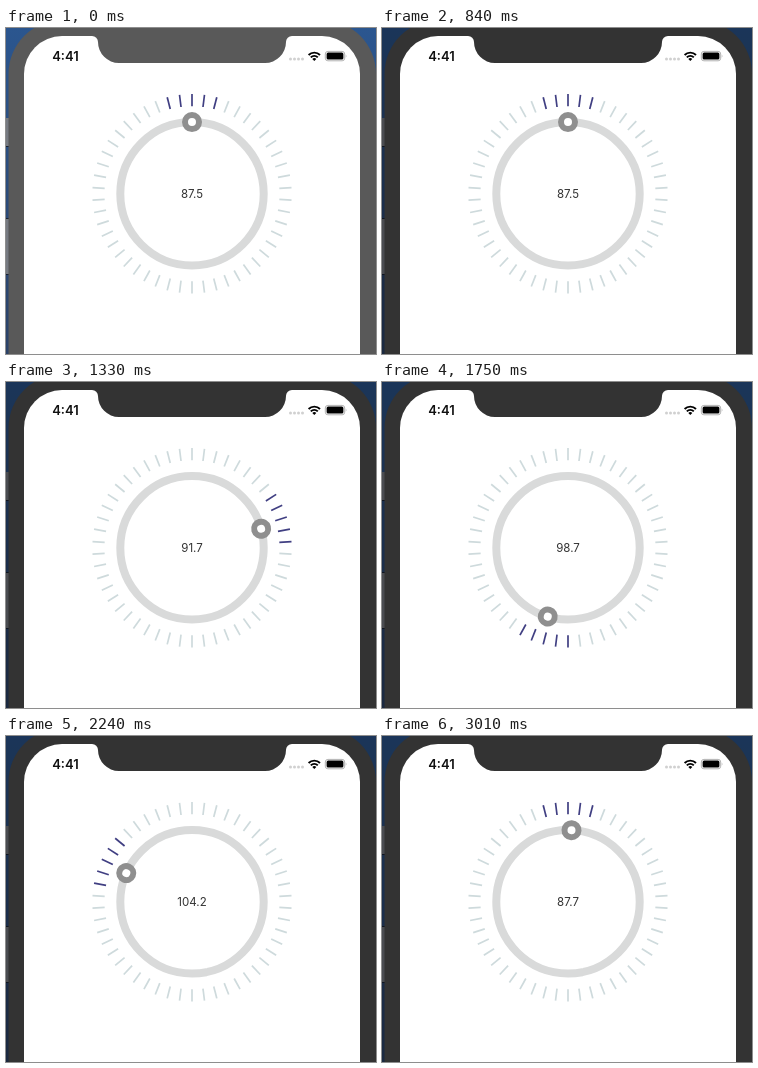
These frames come from a looping animation (370 px wide and 326 px high, 3.64 s). An HTML page:

```html
<!DOCTYPE html>
<html lang="en">
<head>
<meta charset="utf-8">
<title>Dial</title>
<style>
  html, body { margin: 0; width: 100%; height: 100%; overflow: hidden; }
  svg { display: block; width: 370px; height: 326px; font-family: Inter, sans-serif; --case: #333; }
  svg.bright { --case: #595959; }
  .case { fill: var(--case); }
  .backdrop { filter: brightness(.62); }
  .bright .backdrop { filter: none; }
  .tick { stroke: #cedadc; stroke-width: 1.7; }
  .tick.on { stroke: #403f82; }
</style>
</head>
<body>
<svg id="stage" viewBox="0 0 370 326">
  <defs>
    <linearGradient id="sky" x2="0" y2="1">
      <stop offset="0" stop-color="#2b568f"/>
      <stop offset="1" stop-color="#2b4268"/>
    </linearGradient>
  </defs>
  <g class="backdrop">
    <rect width="370" height="326" fill="url(#sky)"/>
    <path d="M0 90h4v28H0zM0 191h4v55H0z" fill="#777b82"/>
    <path d="M0 118h4v1H0zM0 190h4v1H0zM0 246h4v1H0z" fill="#182233"/>
  </g>
  <rect class="case" x="2.5" y="-8" width="367.5" height="400" rx="54"/>
  <rect x="18" y="8" width="336" height="400" rx="38" fill="#fff"/>
  <path class="case" d="M86 7v1a6 6 0 0 1 6 6a21 21 0 0 0 21 21H259a21 21 0 0 0 21-21a6 6 0 0 1 6-6v-1z"/>

  <text x="46.2" y="33" font-size="13" font-weight="600" fill="#111">4:41</text>
  <path d="M284.5 31h12.1" stroke="#d0d0d0" stroke-width="3" stroke-linecap="round" stroke-dasharray="0 4"/>
  <g fill="none" stroke="#000" stroke-width="1.9">
    <path d="M302.6 27a8 8 0 0 1 11.4 0M304.8 29.4a5 5 0 0 1 7 0"/>
    <path d="M308.3 33l-2-2.1a2.9 2.9 0 0 1 4 0z" fill="#000" stroke="none"/>
  </g>
  <rect x="319.3" y="23.4" width="19.4" height="9.4" rx="2.6" fill="none" stroke="#aaa" stroke-width=".9"/>
  <rect x="320.6" y="24.6" width="16.8" height="7" rx="1.5"/>
  <path d="M339.8 26.5q1.4 1.6 0 3.2z" fill="#aaa"/>

  <g transform="translate(186 165.8)">
    <g id="ticks"></g>
    <circle r="71.7" fill="none" stroke="#d9dada" stroke-width="8"/>
    <circle id="knob" cy="-71.7" r="7" fill="#fff" stroke="#8f8f8f" stroke-width="6"/>
    <text id="value" y="4.2" font-size="11.5" text-anchor="middle" fill="#333"></text>
  </g>
</svg>
<script>
const LOOP = 3640, STEP = 70, TICKS = 50, FOCUS_TIME = 840;
const get = id => document.getElementById(id);
const [stage, knob, value, tickGroup] = ['stage', 'knob', 'value', 'ticks'].map(get);

// [time in ms, knob angle in degrees clockwise from the top]
const keys = [[910, 0], [1330, 74.6], [1470, 115], [1750, 196.4],
              [2030, 258], [2520, 331.8], [3010, 362.8]];

const ticks = Array.from({ length: TICKS }, (_, i) => {
  const line = document.createElementNS(stage.namespaceURI, 'path');
  line.setAttribute('d', 'M0-87.5V-99.7');
  line.setAttribute('transform', `rotate(${i * 360 / TICKS})`);
  return tickGroup.appendChild(line);
});

function slope(i) {
  const a = keys[i - 1], b = keys[i + 1];
  return a && b ? (b[1] - a[1]) / (b[0] - a[0]) : 0;
}

// Smooth Hermite curve through the keys, at rest at both ends
function angleAt(time) {
  if (time <= keys[0][0]) return 0;
  const i = keys.findIndex(key => key[0] > time) - 1;
  if (i < 0) return keys.at(-1)[1];
  const [t0, a0] = keys[i], [t1, a1] = keys[i + 1];
  const span = t1 - t0, u = (time - t0) / span, v = 1 - u;
  return a0 * v * v * (1 + 2 * u) + a1 * u * u * (3 - 2 * u)
       + span * u * v * (slope(i) * v - slope(i + 1) * u);
}

function draw(now) {
  const time = Math.floor((now % LOOP) / STEP) * STEP;
  const angle = angleAt(time);
  const turn = angle % 360;
  const center = Math.round(turn / 360 * TICKS);
  stage.classList.toggle('bright', time < FOCUS_TIME);
  knob.setAttribute('transform', `rotate(${turn})`);
  value.textContent = (87.5 + turn * 20.5 / 360).toFixed(1);
  ticks.forEach((line, i) => {
    const near = (i - center + 2 + TICKS) % TICKS < 5;
    line.setAttribute('class', near ? 'tick on' : 'tick');
  });
}

const start = performance.now();
function loop() {
  draw(performance.now() - start);
  requestAnimationFrame(loop);
}
loop();
</script>
</body>
</html>
```
